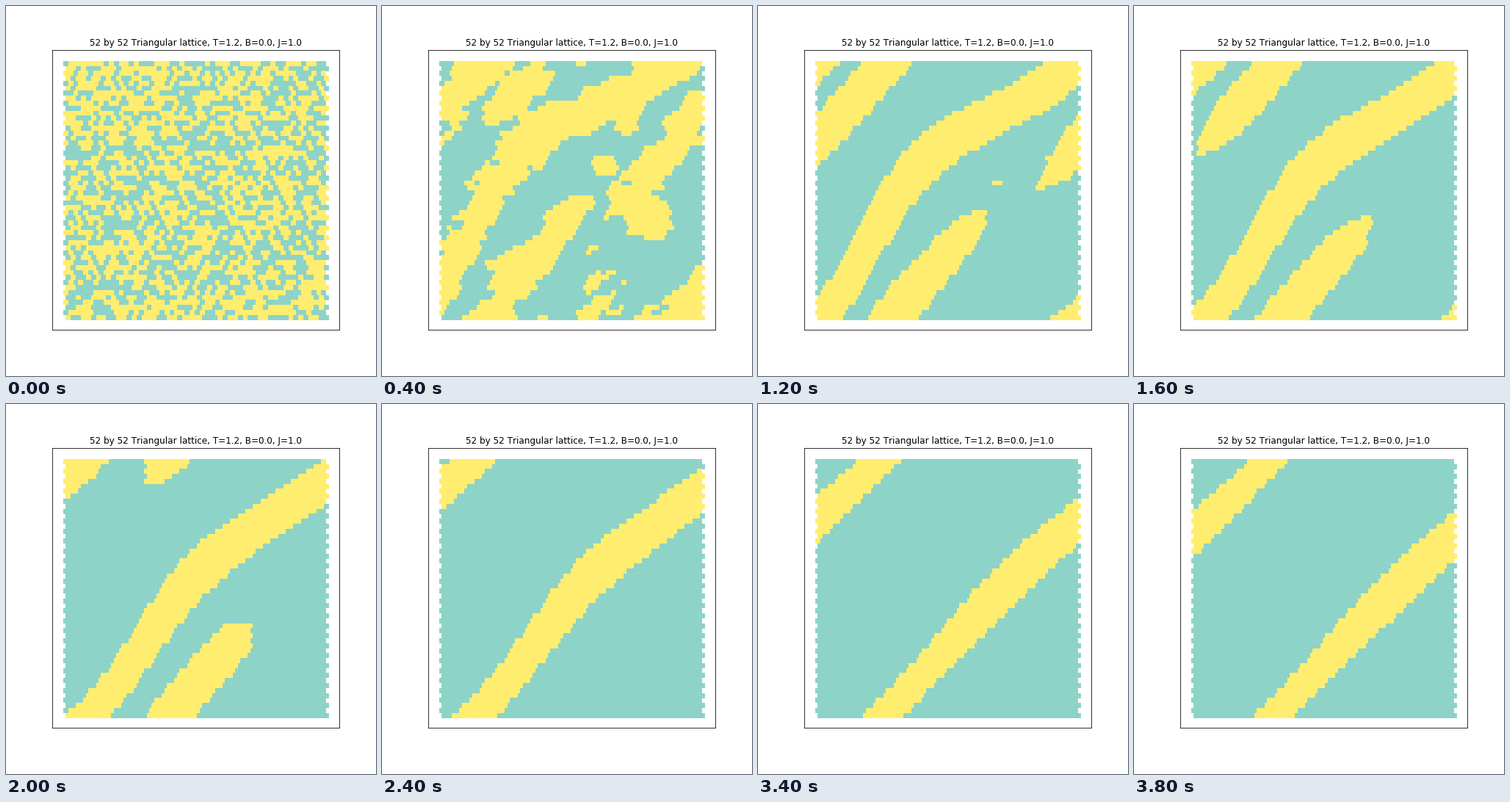
A matplotlib script that plays this animation: 504x504 px, repeating every 4 s.

```python
import numpy as np
import matplotlib.pyplot as plt
from matplotlib.animation import FuncAnimation

plt.rcParams["text.kerning_factor"] = 6

N, FRAMES, STEP_MS = 52, 20, 200
SIZE, DPI = 504, 72

row, col = np.divmod(np.arange(N * N), N)
X, Y = col + 0.5 * (row % 2), row

# islands that soon melt: centre x, y, half length, half width, life in sweeps
ISLANDS = [(15, 6, 13, 4.4, 2), (31.8, 19.8, 4.5, 4, 6), (36.5, 11.4, 5, 4, 2),
           (31.5, 43.5, 7, 2, 2), (32, 48, 8, 2.5, 2), (40.5, 30.5, 7, 7, 2)]


def wave(s, peak):
    return np.cos(np.pi * (s - peak) / N)


def stripe(s, d, t):
    """Closed band around the torus; its bend relaxes with time."""
    bend = 3.5 + 2.9 * np.cos(np.pi * t / FRAMES)
    width = 5.8 - 0.055 * t + 0.7 * wave(s, 16)
    return width - np.abs(d + bend * wave(s, t - 5))


def finger(s, d, t):
    """Open band with a fixed tip that retracts and disappears."""
    length = 54 * np.sqrt(max(0, 1 - (t / 11) ** 2))
    if length == 0:
        return np.full(s.shape, -9.0)
    u = (s - 4.5 + length) / length
    return 5.6 * (1 - u ** 6) - np.abs(d - 17 + 0.07 * s)


def island(x, y, t, cx, cy, a, b, life):
    k = 1 - (t - 2) / life
    if k <= 0:
        return np.full(x.shape, -9.0)
    dx, dy = x - cx - (t - 2), y - cy - (t - 2)
    return k * b * (1 - ((dx - dy) / (k * a)) ** 2) - np.abs(dx + dy)


def domains(t):
    """Positive inside yellow domains, summed up over the periodic images."""
    best = np.full(N * N, -9.0)
    for i in (-N, 0, N):
        for j in (-N, 0, N):
            x, y = X + i, Y + j
            s, d = x - y, x + y - 36.6 - 1.56 * t
            parts = [stripe(s, d, t), finger(s, d, t)]
            parts += [island(x, y, t, *spec) for spec in ISLANDS]
            best = np.maximum(best, np.max(parts, axis=0))
    return np.clip(best, -4, 4)


def smooth(grid):
    near = [(0, 0), (0, 1), (0, -1), (1, 0), (-1, 0), (1, -1), (-1, 1)]
    return sum(np.roll(grid, shift, (0, 1)) for shift in near)


def spins(t):
    """Domains roughened by noise that coarsens, drifts and fades."""
    noise = np.random.default_rng(52).normal(size=(N, N))
    for _ in range(min(t, 3)):
        noise = smooth(noise)
    noise = np.roll(noise / noise.std(), (t, t), (0, 1)).ravel()
    return domains(t) + 24 / (1 + 4 * t * t) * noise > 0


states = [spins(t).astype(float) for t in range(FRAMES)]

fig, ax = plt.subplots(figsize=(SIZE / DPI, SIZE / DPI), dpi=DPI, facecolor="white")
fig.subplots_adjust(left=0.125, right=0.9, bottom=0.125, top=0.88)
dots = ax.scatter(X, Y, c=states[0], s=36, marker="s", linewidths=1,
                  cmap="Set3", vmin=0, vmax=1)
ax.margins(0.05)
ax.invert_yaxis()
ax.set(xticks=[], yticks=[])
ax.set_title("52 by 52 Triangular lattice, T=1.2, B=0.0, J=1.0", fontsize=12)


def update(t):
    dots.set_array(states[t])
    return dots,


anim = FuncAnimation(fig, update, frames=FRAMES, interval=STEP_MS, repeat=True,
                     repeat_delay=0)
plt.show()
```
